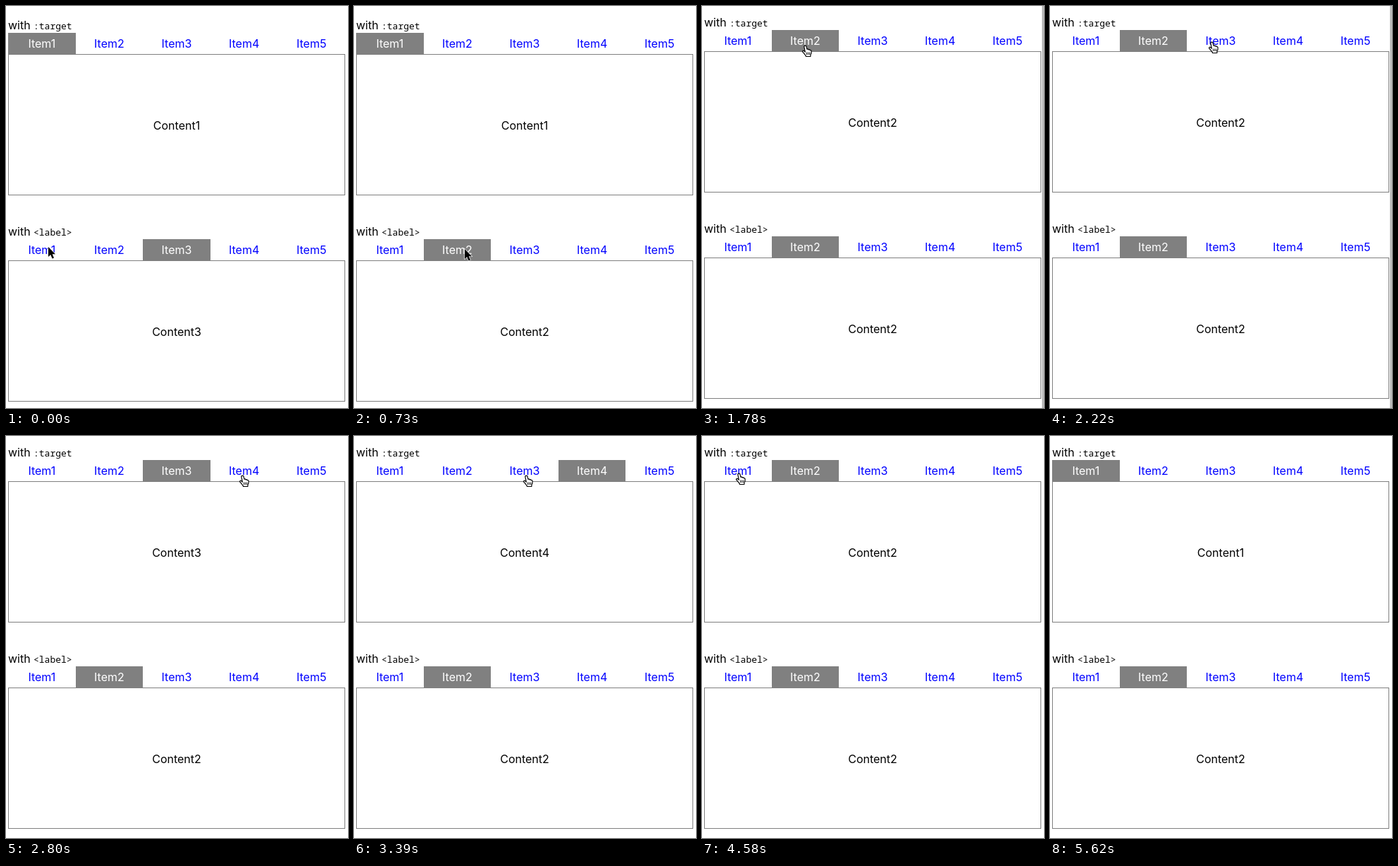
An HTML page for the animation above (5920 ms loop, 485x569 px).

```html
<!DOCTYPE html>
<html lang="en">
<head>
<meta charset="utf-8">
<title>Tab panels</title>
<style>
  html, body { margin: 0; width: 100%; height: 100%; overflow: hidden; background: #fff; }
  svg { display: block; width: 485px; height: 569px; font: 16px Inter, sans-serif; }
  .code { font: 13px "Noto Sans Mono", monospace; }
  .mid { text-anchor: middle; }
  .frame { fill: none; stroke: #808080; }
</style>
</head>
<body>
<svg id="stage" viewBox="0 0 485 569"></svg>
<script>
const LOOP = 5920;
const TAB_WIDTH = 95.6;
const stage = document.getElementById('stage');

// Each track holds [start ms, value...]; a value stays until the next entry.
const pointer = [
  [0, 'arrow', 60, 341], [300, 'arrow', 95, 344], [450, 'arrow', 135, 345],
  [590, 'arrow', 157, 344], [880, 'arrow', 160, 290], [1030, 'arrow', 156, 130],
  [1180, 'arrow', 152, 36], [1330, 'hand', 141, 55], [1930, 'hand', 155, 53],
  [2070, 'hand', 190, 51], [2220, 'hand', 224, 50], [2510, 'hand', 252, 52],
  [2650, 'hand', 300, 54], [2800, 'hand', 330, 55], [3250, 'hand', 285, 55],
  [3390, 'hand', 239, 55], [3840, 'hand', 195, 55], [3990, 'hand', 155, 55],
  [4430, 'hand', 100, 54], [4580, 'hand', 47, 52], [5030, 'arrow', 110, 95],
  [5180, 'arrow', 215, 250], [5330, 'arrow', 330, 420], [5470, 'arrow', 418, 547],
  [5620, 'none', 0, 0]
];
const targetTab = [[0, 1], [1780, 2], [2360, 3], [3100, 4], [3690, 3], [4280, 2], [4880, 1]];
const labelTab = [[0, 3], [150, 1], [590, 2]];
const scrollY = [[0, 0], [1780, 4]];
const scrollbar = [[0, 0], [1780, 1], [2510, 0.6], [2650, 0.25], [2800, 0]];

const cursors = {
  none: '',
  arrow: `<path d="M0 0V14L3.2 11.1 5.6 16.5 8 15.4 5.7 10.2H10Z"
    stroke="#fff" stroke-width="1.2" paint-order="stroke"/>`,
  hand: `<g stroke="#000" stroke-width="1.2" stroke-linejoin="round">
    <path fill="#fff" d="M5 1.2C6 .8 6.8 1.3 7 2.3L7.9 6.2C8.6 5.6 9.7 5.8 10 6.9
      10.9 6.3 11.9 6.7 12.2 7.6 13.2 7.2 14 7.9 14.1 9 14.3 11 13.8 12.5 13 14
      L12.8 16.5H6.5L6 15C4.5 13.5 3.8 12 2 10.3 .8 9 2.3 7.6 3.6 8.6
      L5.3 10 3.9 3.2C3.6 2.2 4.1 1.4 5 1.2Z"/>
    <path stroke-width=".9" d="M7.5 10.5V14M9.5 10.5V14M11.5 10.5V14"/></g>`
};

const at = (track, time) => track.findLast(entry => entry[0] <= time).slice(1);

function tab(number, active) {
  const left = 3 + (number - 1) * TAB_WIDTH;
  const back = active
    ? `<rect x="${Math.round(left)}" y="38" width="${Math.round(left + TAB_WIDTH) - Math.round(left)}" height="30" fill="#808080"/>`
    : '';
  return `${back}<text class="mid" x="${left + TAB_WIDTH / 2}" y="59"
    fill="${active ? '#fff' : '#00f'}">Item${number}</text>`;
}

function panel(top, code, selected) {
  const tabs = [1, 2, 3, 4, 5].map(n => tab(n, n === selected)).join('');
  return `<g transform="translate(0 ${top})">
    <text x="3" y="33">with</text><text class="code" x="39" y="33">${code}</text>
    ${tabs}<rect class="frame" x="3.5" y="68.5" width="477" height="199"/>
    <text class="mid" x="242" y="175">Content${selected}</text></g>`;
}

function render(time) {
  const [shape, x, y] = at(pointer, time);
  const [scroll] = at(scrollY, time);
  const [opacity] = at(scrollbar, time);
  return panel(-scroll, ':target', at(targetTab, time)[0])
    + panel(292 - scroll, '&lt;label&gt;', at(labelTab, time)[0])
    + `<rect x="482" width="3" height="569" fill="#bbb" opacity="${opacity}"/>`
    + `<g transform="translate(${x} ${y})">${cursors[shape]}</g>`;
}

const start = performance.now();
let shown = '';
function tick() {
  const picture = render((performance.now() - start) % LOOP);
  if (picture !== shown) stage.innerHTML = shown = picture;
  requestAnimationFrame(tick);
}
tick();
</script>
</body>
</html>
```
